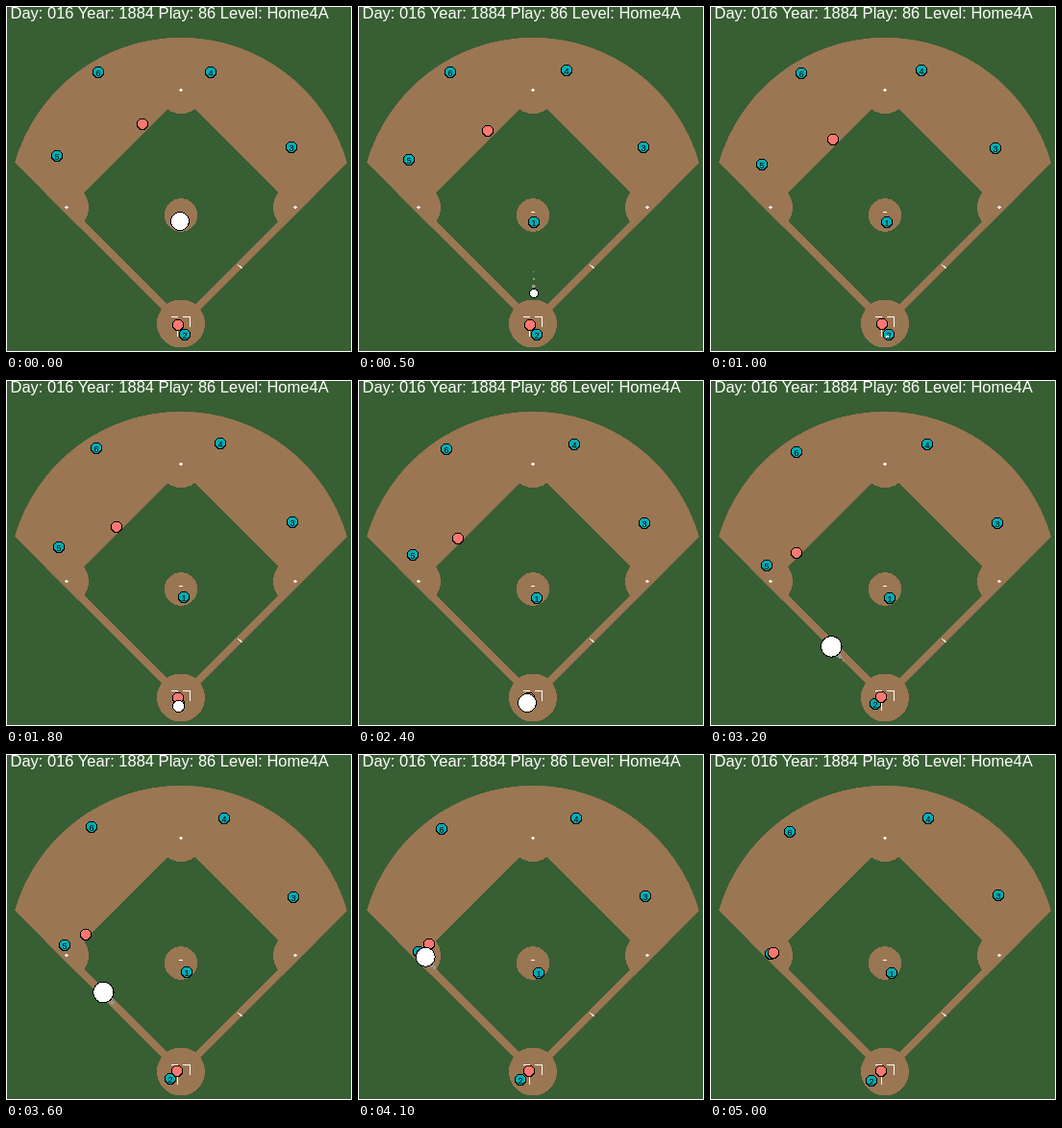
An HTML page that plays this animation: 360 px wide and 360 px high, repeating every 5.1 s.

```html
<!DOCTYPE html>
<html lang="en">
<head>
<meta charset="utf-8">
<title>Baseball play</title>
<style>
  html, body { margin: 0; width: 100%; height: 100%; overflow: hidden; background: #385e33; }
  svg { display: block; shape-rendering: crispEdges; font-family: "Liberation Sans", Arial, sans-serif; }
  .grass { fill: #385e33; }
  .dirt { fill: #9b7653; }
  .chalk { fill: none; stroke: #fff; }
  .base { fill: #fff; }
  .player { stroke: #000; }
  .label { font-size: 9px; text-anchor: middle; }
  .caption { font-size: 16.5px; fill: #fff; }
</style>
</head>
<body>
<svg id="stage" width="360" height="360" viewBox="0 0 360 360">
  <defs>
    <clipPath id="fair"><path id="fan" d="M9 163A180 180 0 0 1 355 163L182 336Z"/></clipPath>
    <path id="bag" class="base" d="M0-2L2 0L0 2L-2 0Z"/>
  </defs>
  <rect class="grass" width="360" height="360"/>
  <g clip-path="url(#fair)">
    <use href="#fan" class="dirt"/>
    <path class="grass" d="M182 93L298 209L182 325L66 209Z"/>
    <g class="dirt">
      <circle cx="182" cy="87.5" r="24.5"/>
      <circle cx="61.5" cy="209.5" r="24.5"/>
      <circle cx="302.5" cy="209.5" r="24.5"/>
    </g>
  </g>
  <g class="dirt">
    <circle cx="182" cy="330.5" r="25"/>
    <circle cx="182" cy="217.5" r="17.3"/>
  </g>
  <use href="#bag" x="182" y="87.5"/>
  <use href="#bag" x="63" y="209.5"/>
  <use href="#bag" x="301" y="209.5"/>
  <path class="chalk" d="M180 214.5h4M172 323.5h7M184 323.5h7.5v10.5M178.5 335v9M241.5 269.5l5 4"/>
  <rect class="chalk" x=".5" y=".5" width="359" height="359"/>
  <g id="players"></g>
  <g id="trail" fill="#969691"></g>
  <circle id="ball" fill="#fff"/>
  <text class="caption" x="4.5" y="13">Day: 016 Year: 1884 Play: 86 Level: Home4A</text>
</svg>
<script>
const LOOP = 5100, STEP = 100, PLAY_END = 5000;
const TEAL = '#00adb5', PINK = '#fa7870';
const byId = id => document.getElementById(id);
const lerp = (a, b, u) => a + (b - a) * u;
const clamp = u => Math.max(0, Math.min(1, u));
const speedUp = power => u => u ** power;
const slowDown = power => u => 1 - (1 - u) ** power;

// Everyone drifts once from one spot to another; bend bows the path sideways.
const players = [
  { label: '6', from: [96, 69], to: [83, 81], ease: speedUp(1.7) },
  { label: '4', from: [213, 69], to: [227, 67], ease: slowDown(3), bend: [0, -1.5] },
  { label: '3', from: [297, 147], to: [300, 147], ease: speedUp(1.5), bend: [0, 2] },
  { label: '5', from: [53, 156], to: [63, 208], ease: speedUp(1.25), end: 4200, bend: [-1.3, 0] },
  { label: '1', from: [182, 224], to: [189, 228], ease: slowDown(1.5) },
  { label: '2', from: [186, 342], to: [168, 340], ease: slowDown(1.8), start: 1000, bend: [0, -4.5] },
  { from: [142, 123], to: [66, 207], ease: speedUp(1.1), end: 4550 },
  { from: [179, 332], to: [178, 330], ease: slowDown(1.5) }
];

// Pitch, catcher's wind-up and throw to third; size shows the ball's height.
const legs = [
  { start: 0, end: 800, from: [181, 224], to: [184.5, 344], size: [9.5, 1.5], lift: 0 },
  { start: 1000, end: 2400, from: [184.5, 344], to: [176, 336], size: [1.5, 9.5], lift: 0 },
  { start: 2400, end: 4200, from: [176, 336], to: [64, 204], size: [9.5, 9.8], lift: 1.2 }
];
const CAUGHT = 4300;

function add(parent, tag, attributes, text = '') {
  const node = document.createElementNS('http://www.w3.org/2000/svg', tag);
  setAll(node, attributes);
  node.textContent = text;
  return parent.appendChild(node);
}

function setAll(node, attributes) {
  for (const name in attributes) node.setAttribute(name, attributes[name]);
}

const octagon = Array.from({ length: 8 }, (_, i) => {
  const angle = (i + 0.5) * Math.PI / 4;
  return [5.9 * Math.cos(angle), 5.9 * Math.sin(angle)];
}).join(' ');

for (const player of players) {
  player.node = add(byId('players'), 'g', {});
  add(player.node, 'polygon', { class: 'player', points: octagon, fill: player.label ? TEAL : PINK });
  if (player.label) add(player.node, 'text', { class: 'label', y: 4 }, player.label);
}

const trail = [1, 2, 3, 4].map(age => ({ age, node: add(byId('trail'), 'circle', {}) }));

function movePlayer({ node, from, to, ease, start = 0, end = PLAY_END, bend = [0, 0] }, t) {
  const u = ease(clamp((t - start) / (end - start)));
  const spot = from.map((a, i) => Math.round(lerp(a, to[i], u) + bend[i] * Math.sin(Math.PI * u)));
  node.setAttribute('transform', `translate(${spot})`);
}

function ballAt(t) {
  const leg = legs.findLast(({ start }) => t >= start) || legs[0];
  const u = clamp((t - leg.start) / (leg.end - leg.start));
  return {
    cx: lerp(leg.from[0], leg.to[0], u),
    cy: lerp(leg.from[1], leg.to[1], u),
    r: lerp(...leg.size, u) + leg.lift * Math.sin(Math.PI * u)
  };
}

function moveBall(t) {
  const visibility = t < CAUGHT ? 'visible' : 'hidden';
  const ball = ballAt(t);
  setAll(byId('ball'), { ...ball, visibility, stroke: ball.r > 2 ? '#000' : 'none' });
  for (const { age, node } of trail) {
    setAll(node, { ...ballAt(t - 50 * age), r: ball.r * (0.5 - 0.1 * age), visibility });
  }
}

function frame() {
  const t = Math.floor((performance.now() % LOOP) / STEP) * STEP;
  players.forEach(player => movePlayer(player, t));
  moveBall(t);
  requestAnimationFrame(frame);
}
requestAnimationFrame(frame);
</script>
</body>
</html>
```
